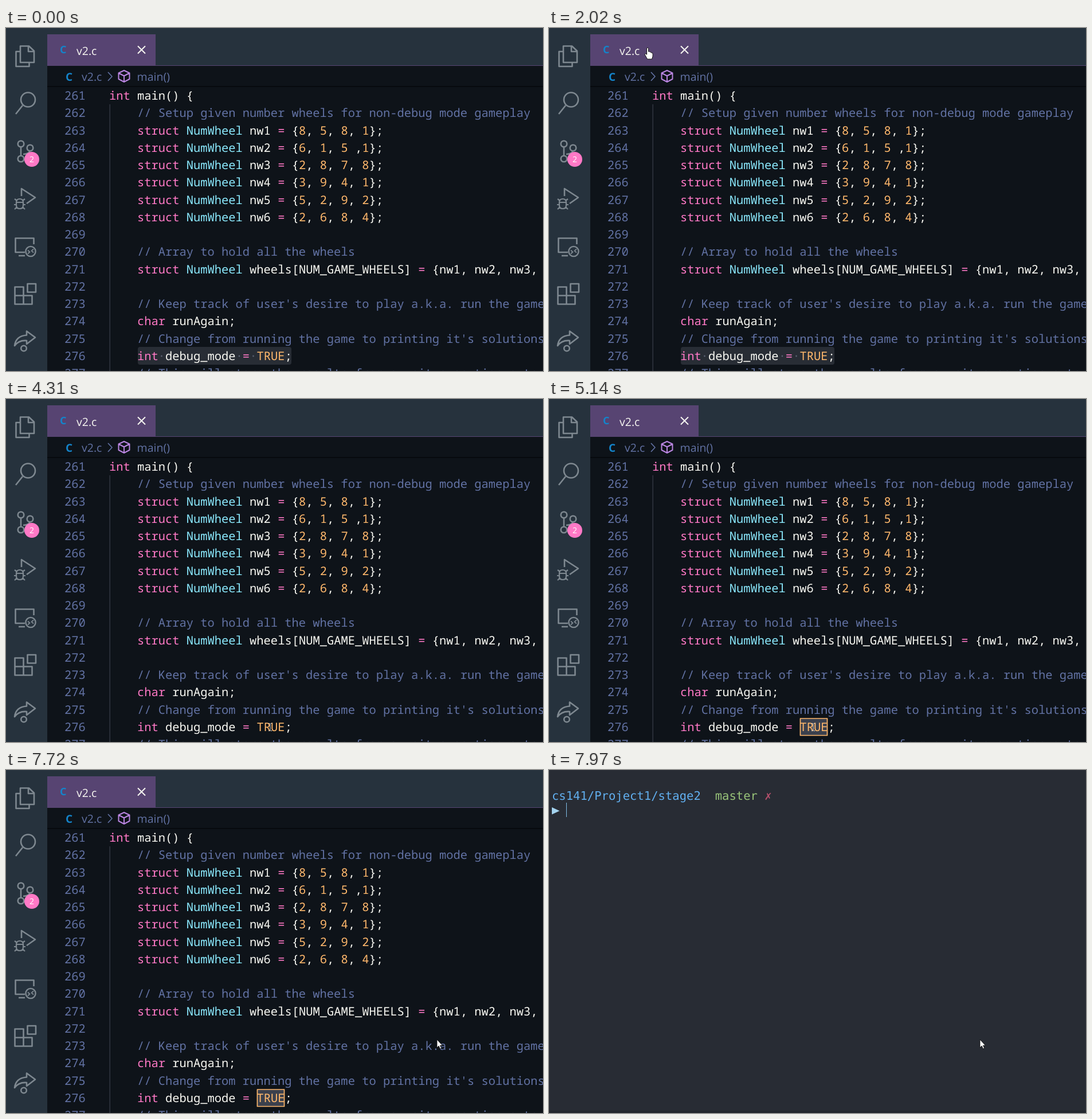
An HTML page for the animation above (8 s loop, 937 by 598 pixels).

```html
<!DOCTYPE html>
<html lang="en">
<head>
<meta charset="utf-8">
<title>Editor and terminal</title>
<style>
  html, body { margin: 0; width: 100%; height: 100%; overflow: hidden; background: #0e1319; }
  svg { display: block; width: 100%; height: 100%; }
  text { white-space: pre; text-rendering: geometricPrecision; font-variant-ligatures: none; }
  .code { font: 500 20.43px "Noto Sans Mono", monospace; fill: #f8f8f2; }
  .ui { font: 19.5px "Open Sans", sans-serif; }
  .term { font: 20.56px "DejaVu Sans Mono", monospace; }
  .line { fill: none; stroke-linejoin: round; }
  .muted { fill: #6272a4; }
  .keyword { fill: #ff79c6; }
  .type { fill: #8be9fd; }
  .value { fill: #ffb86c; }
</style>
</head>
<body>
<svg viewBox="0 0 937 598">
  <g id="editor">
    <path fill="#0e1319" d="M0 0H937V598H0z"/>
    <path fill="#26323d" d="M0 0H937V65H72V598H0z"/>
    <path fill="#574472" d="M72 11H261V65H937V66H72z"/>

    <g class="line" stroke="#7e8890" stroke-width="2.6">
      <path d="M25 31.5H40L49 40V60H25zM39 32V41H48M24 41H17.5V67H40.5V61"/>
      <path d="M29 135L17 150"/><circle cx="38.5" cy="125" r="12.5"/>
      <circle cx="26" cy="202" r="5.3"/><circle cx="42" cy="209" r="5.3"/><circle cx="26" cy="228" r="5.3"/>
      <path d="M26 207V223M42 214Q40 220 30 220"/>
      <path d="M27 293V280L51 295.5L36 306"/>
      <path stroke-width="2.2" d="M18 304Q18 298 24 298T30 304V309Q30 315 24 315T18 309zM18 304H30M19 301L15 298M29 301L33 298M18 308H14M30 308H34M19 312L15 316M29 312L33 316"/>
      <path d="M33 391H16.5V366.5H48.5V377M22 397H33"/>
      <circle cx="43" cy="389.5" r="8.6" stroke-width="2.4"/>
      <path stroke-width="1.8" d="M38 387.5L41.5 390.5L38 393.5M48 385.5L44.5 388.5L48 391.5"/>
      <path d="M15.5 451.5H30.5V466.5H45.5V481.5H15.5zM15.5 466.5H30.5V481M37.5 446H52V460.5H37.5z"/>
      <path d="M36 528.5L51 539.5L36 551V545Q22 544 15 554Q17 537 36 535.5z"/><circle cx="31" cy="558.5" r="4.8"/>
    </g>
    <circle cx="45" cy="229" r="13" fill="#ff79c6"/>
    <text class="ui" x="45" y="234" text-anchor="middle" fill="#fff" style="font-size:14px">2</text>

    <g class="ui">
      <g fill="#1484ca" font-weight="bold"><text x="94" y="44" style="font-size:18px">C</text><text x="104" y="92" style="font-size:19px">C</text></g>
      <text x="123" y="47" fill="#f8f8f2">v2.c</text>
      <text class="muted" x="132" y="92">v2.c</text>
      <text class="muted" x="228.5" y="92">main()</text>
    </g>
    <path class="line" stroke="#f8f8f2" stroke-width="2" d="M230 31.5L243 44.5M243 31.5L230 44.5"/>
    <path class="line" stroke="#6272a4" stroke-width="1.7" d="M178 77L185 84.5L178 92"/>
    <path class="line" stroke="#b985e0" stroke-width="2" d="M206 74L215.5 78.5V89L206 94L196.5 89V78.5zM196.5 78.5L206 83.5L215.5 78.5M206 83.5V94"/>
    <path fill="#070a0e" d="M72 101H937V103H72z"/>
    <path fill="#303641" d="M180.5 133H182V598H180.5z"/>

    <g id="wideSelection">
      <rect x="230" y="556" width="268" height="31" rx="4" fill="#282d35"/>
      <g fill="#596070"><circle cx="271.5" cy="572" r="1.4"/><circle cx="407" cy="572" r="1.4"/><circle cx="431.500" cy="572" r="1.4"/></g>
    </g>
    <rect id="wordSelection" x="438" y="557" width="48" height="30" fill="#3b404d"/>
    <g id="lines" class="code"></g>
    <rect id="wordBorder" class="line" x="438.5" y="557" width="47" height="29.5" stroke="#ffb86c" stroke-width="1.7"/>
    <rect id="caret" x="486" y="556" width="2" height="31" fill="#c8c8c4"/>
  </g>

  <g id="terminal">
    <path fill="#282c34" d="M0 0H937V598H0z"/>
    <path fill="#23272e" d="M0 594H937V598H0z"/>
    <g class="term">
      <text x="5" y="52" fill="#61afef">cs141/Project1/stage2</text>
      <text x="289.7" y="52" fill="#98c379">master</text>
      <text x="376.3" y="52" fill="#b5506c">✗</text>
    </g>
    <path fill="#a4d3ee" d="M5 65L18.5 71.3L5 77.5z"/>
    <path fill="#80bfe8" d="M30 57H31V82H30z"/>
  </g>

  <g id="cursor">
    <path id="arrow" fill="#fff" stroke="#0a0a0a" stroke-width=".8" d="M0 0V14L3.2 11L5.3 16L7.6 15L5.5 10.2H9.5z"/>
    <path id="hand" fill="#fff" stroke="#111" stroke-width="1" stroke-linejoin="round" d="M-2 1Q-.5 -.5 1 1V7Q3 6 4 8Q5.500 7 6 9Q8.500 8.500 8.500 11V15L7 20H-1L-5.500 12Q-4.500 9 -2 12z"/>
    <path id="beam" class="line" stroke="#d8d8d8" d="M-3 -6.500H-1L0 -5.500L1 -6.500H3M0 -5.500V5.500M-3 6.500H-1L0 5.500L1 6.500H3"/>
  </g>
</svg>
<script>
const LOOP = 8000, PITCH = 12.26;
const el = id => document.getElementById(id);
const show = (id, on) => el(id).setAttribute("visibility", on ? "visible" : "hidden");

const wheels = ["8, 5, 8, 1", "6, 1, 5 ,1", "2, 8, 7, 8", "3, 9, 4, 1", "5, 2, 9, 2", "2, 6, 8, 4"];
const source = [
  "int main() {",
  "    // Setup given number wheels for non-debug mode gameplay",
  ...wheels.map((w, i) => `    struct NumWheel nw${i + 1} = {${w}};`),
  "",
  "    // Array to hold all the wheels",
  "    struct NumWheel wheels[NUM_GAME_WHEELS] = {nw1, nw2, nw3, nw4, nw5, nw6};",
  "",
  "    // Keep track of user's desire to play a.k.a. run the game again",
  "    char runAgain;",
  "    // Change from running the game to printing it's solutions",
  "    int debug_mode = TRUE;",
  "    // This will store the results from a unit execution output"
];
const tokens = /(?<muted>\/\/.*)|(?<keyword>\b(?:int|struct|char)\b|=)|(?<type>NumWheel)|(?<value>\b\d\b|TRUE)/g;
const paint = code => code.replace(tokens, (match, ...rest) => {
  const kinds = rest.at(-1);
  return `<tspan class="${Object.keys(kinds).find(k => kinds[k])}">${match}</tspan>`;
});
el("lines").innerHTML = source.map((line, i) => {
  const code = line.trimStart(), y = 125.2 + i * 30.24;
  const x = 180 + (line.length - code.length) * PITCH;
  return `<text class="muted" x="102" y="${y}">${261 + i}</text><text x="${x}" y="${y}">${paint(code)}</text>`;
}).join("");

const mix = (a, b, p) => a + (b - a) * p;
const easeOut = power => p => 1 - (1 - p) ** power;
const glide = (x0, y0, x1, y1, ease = p => p) => p => [mix(x0, x1, ease(p)), mix(y0, y1, ease(p))];
const circle = angle => [147 + 26 * Math.cos(angle), 38 + 22 * Math.sin(angle)];
const leaveTab = glide(172, 43, 288, 289, p => p * p);

// Each move: first step, last step, number of steps, path
const moves = [
  [360, 620, 4, glide(690, 410, 407, 50, easeOut(1.5))],
  [850, 1160, 5, glide(407, 50, 178, 50, easeOut(4.2))],
  [1390, 2170, 11, p => circle(.53 + 14.5 * p)],
  [2250, 3040, 11, p => p < .5 ? circle(2.5 + 8 * p) : leaveTab(2 * p - 1)],
  [3110, 3190, 2, glide(288, 289, 319, 329)],
  [3360, 4080, 10, glide(319, 329, 461, 572, p => p ** 1.4)],
  [6330, 6630, 5, glide(461, 572, 716, 475)],
  [6940, 7090, 3, glide(716, 475, 754, 470)]
];
const caretToggles = [4470, 5140, 5670, 6150, 6630, 7090];

function cursorAt(t) {
  const move = moves.findLast(m => t >= m[0]);
  if (!move) return null;
  const [start, end, steps, path] = move;
  const step = Math.floor((t - start) / (end - start) * (steps - 1) + 1e-6);
  return path(Math.min(1, (step + 1) / steps));
}

function cursorKind(t, x, y) {
  if (t >= 7720) return "arrow";
  if (x > 72 && x < 261 && y > 11 && y < 66) return "hand";
  return y > 102 ? "beam" : "arrow";
}

function draw(t) {
  show("wideSelection", t < 4230);
  show("wordSelection", t >= 4470 && t < 7820);
  show("wordBorder", t >= 4870 && t < 7820);
  show("caret", caretToggles.filter(c => t >= c).length % 2);
  show("terminal", t >= 7820);

  const position = cursorAt(t);
  const [x, y] = t >= 7720 ? [752, 470] : position || [0, 0];
  const kind = position && cursorKind(t, x, y);
  for (const id of ["arrow", "hand", "beam"]) show(id, id === kind);
  el("cursor").setAttribute("transform", `translate(${x.toFixed(1)} ${y.toFixed(1)})`);
}

const began = performance.now();
function tick() {
  draw((performance.now() - began) % LOOP);
  requestAnimationFrame(tick);
}
tick();
</script>
</body>
</html>
```
